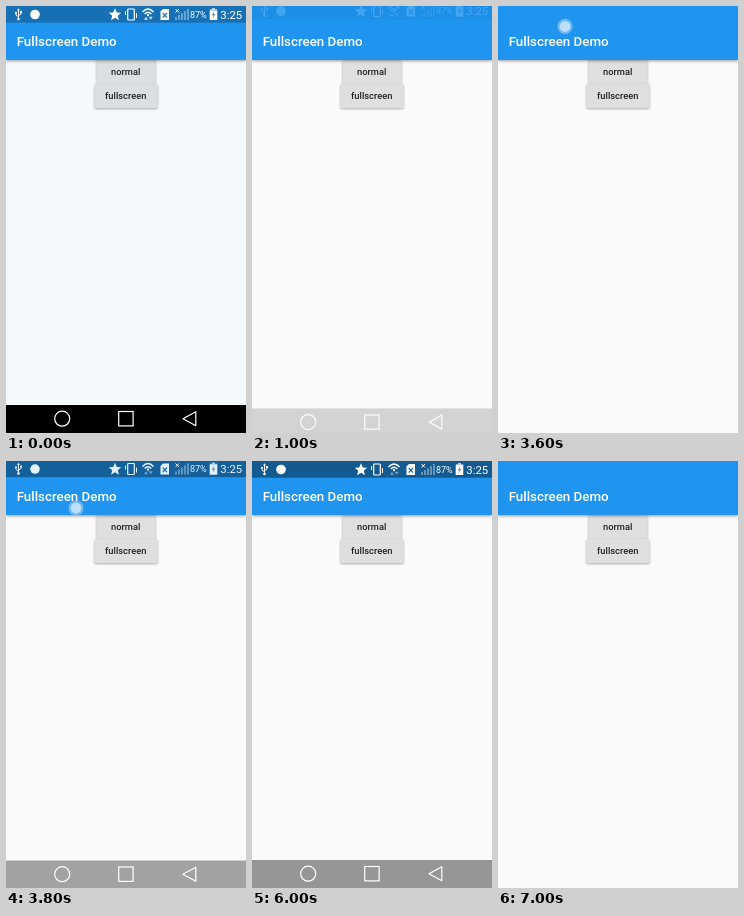
Write an HTML page that moves like this. It is 240x427 px and loops after 8000 ms.

```html
<!DOCTYPE html>
<html lang="en">
<head>
<meta charset="utf-8">
<title>Fullscreen Demo</title>
<style>
  html, body { margin: 0; width: 100%; height: 100%; overflow: hidden; }
  svg { display: block; width: 100vw; height: 100vh; font-family: Roboto, sans-serif; }
  .label { font-size: 9.33px; font-weight: 500; fill: #222; text-anchor: middle; }
  .btn { filter: drop-shadow(0 1px 1px rgba(0,0,0,.32)); }
  .line { fill: none; stroke: #fff; }
</style>
</head>
<body>
<svg viewBox="0 0 240 427">
  <rect id="page" width="240" height="427"/>
  <g id="buttons">
    <rect class="btn" x="90.7" y="54" width="58.7" height="24" rx="1.3"/>
    <rect class="btn" x="88.5" y="78" width="63" height="24" rx="1.3"/>
  </g>
  <text class="label" x="119.7" y="69.3">normal</text>
  <text class="label" x="119.7" y="93.3">fullscreen</text>

  <rect width="240" height="54" fill="#2095f0" style="filter:drop-shadow(0 1px 1.5px rgba(0,0,0,.4))"/>
  <text x="10.7" y="40" font-size="13.33" font-weight="500" fill="#fff">Fullscreen Demo</text>

  <g id="status">
    <rect id="statusBack" width="240" height="16.7"/>
    <g fill="#fff">
      <!-- usb -->
      <path class="line" d="M12.5 4V13M12.5 11L10 9V7M12.5 9.5L15 8V6"/>
      <path d="M11 4.5L12.5 2.2L14 4.5Z"/>
      <circle cx="12.5" cy="13" r="1.3"/><circle cx="10" cy="6.8" r="1"/><rect x="14" y="5" width="2" height="2"/>
      <circle cx="29" cy="8.5" r="4.8"/>
      <path d="M109 2.2L110.8 6.4L115.2 6.8L111.8 9.7L112.9 14.2L109 11.8L105.1 14.2L106.2 9.7L102.8 6.8L107.2 6.4Z"/>
      <!-- vibrate -->
      <rect class="line" x="121.7" y="3" width="6.6" height="11" rx=".8" stroke-width="1.2"/>
      <path class="line" d="M119.5 5V9M130.5 7V12" stroke-width="1"/>
      <!-- wifi -->
      <path class="line" d="M136.5 6Q142 0 147.5 6M138.7 8Q142 4.5 145.3 8" stroke-width="1.4"/>
      <circle cx="142" cy="9.2" r="1.1"/>
      <path id="arrows" d="M138 13.8L140 10.8L142 13.8ZM142.7 10.8H146.7L144.7 13.8Z"/>
      <!-- card -->
      <path d="M157 3H163V14H154.5V5.5Z"/>
      <path d="M156.7 7L161 11.7M161 7L156.7 11.7" stroke="#1970b6" stroke-width="1.2"/>
      <!-- signal -->
      <path class="line" d="M170 14V11M173 14V9M176 14V7M179 14V5M182 14V3" stroke-width="1.7" opacity=".42"/>
      <path class="line" d="M169.5 3L173 6.5M173 3L169.5 6.5" stroke-width="1"/>
      <text x="184" y="11.9" font-size="9">87%</text>
      <!-- battery -->
      <path d="M206 2H209V3.2H211.2V14H203.8V3.2H206Z" opacity=".72"/>
      <rect id="level" x="203.8" width="7.4"/>
      <path d="M208.4 5L205.6 9.2H207.3L206.6 12.4L209.5 8H207.8Z" fill="#7896a8"/>
      <text x="214.3" y="12.7" font-size="11.4">3:25</text>
    </g>
  </g>

  <g id="nav">
    <rect id="navBack" y="399" width="240" height="28"/>
    <g class="line" stroke-width="1.2">
      <circle cx="56.2" cy="412.7" r="7.5"/>
      <rect x="112.7" y="405.5" width="14.4" height="14.4"/>
      <path d="M177 412.7L189.8 405.7V419.7Z" stroke-linejoin="round"/>
    </g>
  </g>

  <g id="touch" fill="#fff">
    <circle r="7.7" fill-opacity=".34" stroke="#648ca0" stroke-opacity=".3" stroke-width=".7"/>
    <circle r="5.4" fill-opacity=".55"/>
  </g>
</svg>
<script>
const LOOP = 8000, STEP = 200;
const el = id => document.getElementById(id);
const set = (id, attrs) => {
  for (const key in attrs) el(id).setAttribute(key, attrs[key]);
};

// How far the system bars are visible, 0 to 1
function barShow(t) {
  if (t < 1000) return 1;
  if (t < 1200) return .15;
  if (t < 3800) return 0;
  if (t < 4000) return .88;
  if (t < 6800) return 1;
  return t < 7000 ? .85 : 0;
}

function touchAt(t) {
  if (t === 800) return [127, 90];
  if (t === 3600) return [67, 20.5];
  if (t === 3800) return [70, 47];
}

function draw(t) {
  const overlay = t >= 3800, tinted = t < 800;
  const show = barShow(t), touch = touchAt(t);
  set("page", { fill: tinted ? "#f4f9fd" : "#fafafa" });
  set("buttons", { fill: tinted ? "#dae0e1" : "#dfdfdf" });
  set("statusBack", { "fill-opacity": overlay ? .4 : .25 });
  set("navBack", { "fill-opacity": overlay ? .4 : 1 });
  set("status", { opacity: show, transform: `translate(0 ${(show - 1) * 4})` });
  set("nav", { opacity: show, transform: `translate(0 ${(1 - show) * 4})` });

  const bright = t < 1200 || (t >= 5000 && t < 6000);
  set("arrows", { opacity: bright ? .8 : .45 });
  const changes = [400, 4400, 5000, 5600, 6000, 6600].filter(c => c <= t).length;
  const top = changes % 2 ? 4.2 : 5.2;
  set("level", { y: top, height: 14 - top });

  set("touch", {
    visibility: touch ? "visible" : "hidden",
    transform: `translate(${touch || [0, 0]})`
  });
}

const start = performance.now();
function tick() {
  const t = (performance.now() - start) % LOOP;
  draw(Math.floor(t / STEP) * STEP);
  requestAnimationFrame(tick);
}
tick();
</script>
</body>
</html>
```
